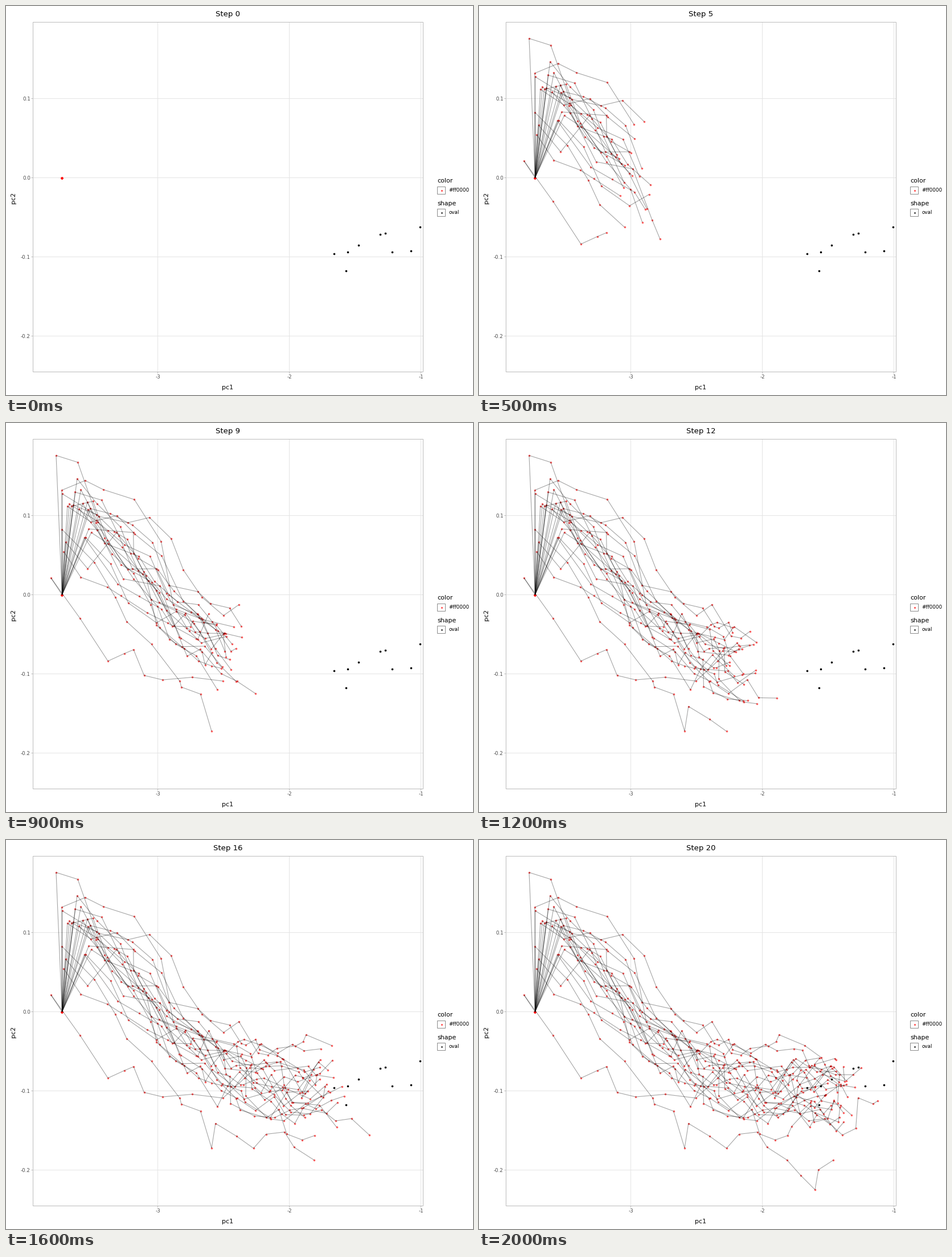
A matplotlib script for the animation above (2.1 s loop, 820 by 683 pixels).

```python
import numpy as np
import matplotlib.pyplot as plt
from matplotlib.animation import FuncAnimation
from matplotlib.collections import LineCollection
from matplotlib.patches import Rectangle

W, H, DPI = 820, 683, 64
PX = 72 / DPI  # points per pixel
STEPS, WALKERS = 20, 23
LEFT, TOP, RIGHT, BOTTOM = 47.5, 28.5, 732.5, 642.5
GRID, EDGE, TICK_TEXT = "#e4e4e4", "#bcbcbc", "#4d4d4d"

plt.rcParams["font.family"] = "DejaVu Sans"


def to_px(pc1, pc2):
    """Stage position of a data point."""
    return np.column_stack([959.3 + 230.8 * np.asarray(pc1, float),
                            301.5 - 1391 * np.asarray(pc2, float)])


START = to_px([-3.73], [0])[0]

# Key positions by step of the few walkers that shape the outline.
OUTLIERS = [
    {1: (88, 57), 2: (126, 69), 3: (173, 202)},
    {1: (98, 118), 2: (139, 101), 3: (171, 117)},
    {1: (79, 272), 2: (130, 343), 3: (179, 418), 5: (224, 398), 7: (275, 451)},
    {4: (252, 166), 5: (290, 203), 8: (382, 338), 15: (527, 342)},
    {3: (270, 286), 9: (438, 475), 12: (523, 483), 16: (638, 518), 20: (700, 458)},
    {9: (361, 541), 16: (541, 562), 18: (590, 614), 19: (596, 579)},
]


def bend(path, keys):
    """Pull a path through its key positions, fading out before and after."""
    steps = sorted(keys)
    gaps = [np.subtract(keys[s], path[s]) for s in steps]
    knots = [steps[0] - 4, *steps, steps[-1] + 5]
    gaps = np.array([(0, 0), *gaps, (0, 0)])
    t = np.arange(len(path))
    return path + np.column_stack([np.interp(t, knots, g) for g in gaps.T])


def make_paths(seed=7):
    rng = np.random.default_rng(seed)
    t = np.arange(STEPS + 1)
    centre = np.column_stack([
        np.interp(t, [1, 3, 5, 9, 16, 20], [118, 202, 268, 393, 566, 638]),
        np.interp(t, [1, 3, 5, 7, 9, 12, 20], [160, 225, 305, 368, 410, 443, 455])])
    noise = np.interp(t, [1, 5, 20], [40, 26, 24])
    reach = np.column_stack([np.full(STEPS + 1, 48.0),
                             np.interp(t, [1, 5, 12, 20], [150, 130, 105, 95])])

    paths = np.empty((WALKERS, STEPS + 1, 2))
    for i, path in enumerate(paths):
        drift = np.zeros_like(path)
        drift[1] = -38 + 76 * i / (WALKERS - 1), rng.normal(0, 35)
        for k in range(2, STEPS + 1):
            drift[k] = 0.78 * drift[k - 1] + rng.normal(0, (14, noise[k]))
        path[:] = centre + reach * np.tanh(drift / reach)
        if i < len(OUTLIERS):
            path[:] = bend(path, OUTLIERS[i])
        path[0] = START
    return paths


fig = plt.figure(figsize=(W / DPI, H / DPI), dpi=DPI, facecolor="white")
ax = fig.add_axes([0, 0, 1, 1])
ax.set(xlim=(0, W), ylim=(H, 0))
ax.axis("off")


def label(x, y, text, size, color="black", ha="left", va="baseline", **kw):
    return ax.text(x, y, text, fontsize=size * PX, color=color, ha=ha, va=va, **kw)


def line(xs, ys, color):
    ax.plot(xs, ys, color=color, lw=PX, zorder=1, solid_capstyle="butt", snap=False)


def box(x, y, w, h, color):
    ax.add_patch(Rectangle((x, y), w, h, fill=False, ec=color, lw=PX,
                           zorder=2, snap=False))


def dots(xy, color, size, alpha, zorder):
    x, y = np.transpose(xy)
    return ax.scatter(x, y, s=(size * PX) ** 2, color=color, alpha=alpha,
                      linewidths=0, zorder=zorder)


for value in (-3, -2, -1):
    x = np.floor(to_px(value, 0)[0, 0]) + 0.5
    line([x, x], [TOP, BOTTOM], GRID)
    line([x, x], [BOTTOM, BOTTOM + 3], EDGE)
    label(x, 654.5, str(value), 8.8, TICK_TEXT, "center")
for value in (0.1, 0.0, -0.1, -0.2):
    y = np.floor(to_px(0, value)[0, 1]) + 0.5
    line([LEFT, RIGHT], [y, y], GRID)
    line([LEFT - 3, LEFT], [y, y], EDGE)
    label(42.8, y + 3.2, f"{value:.1f}", 8.8, TICK_TEXT, "right")
box(LEFT, TOP, RIGHT - LEFT, BOTTOM - TOP, EDGE)

title = label(389.5, 18.3, "", 13.2, ha="center")
label(389.3, 673, "pc1", 11, ha="center")
label(13, 337, "pc2", 11, ha="center", va="center", rotation=90)

for y, head, name, color in ((310.5, "color", "#ff0000", "red"),
                             (349.5, "shape", "oval", "black")):
    label(757.4, y, head, 11)
    box(757.5, y + 7, 14, 13, "#8c8c8c")
    dots([(765, y + 13.6)], color, 3.2, 0.65, 3)
    label(777, y + 15.9, name, 8.8)

paths = make_paths()
visited = paths.swapaxes(0, 1).reshape(-1, 2)
segments = np.stack([paths[:, :-1], paths[:, 1:]], axis=2)
segments = segments.swapaxes(0, 1).reshape(-1, 2, 2)

red = dots([START], "red", 3.5, 0.62, 3)
trails = LineCollection([], colors=[(0, 0, 0, 0.36)], linewidths=1.1 * PX, zorder=4)
ax.add_collection(trails, autolim=False)
goals = to_px([-1.66, -1.57, -1.555, -1.476, -1.31, -1.27, -1.22, -1.075, -1.005],
              [-.096, -.1175, -.0935, -.0855, -.0718, -.07, -.0937, -.0927, -.0623])
dots(goals, "black", 3.6, 1, 5)


def draw(step):
    title.set_text(f"Step {step}")
    red.set_offsets(visited[:WALKERS * (step + 1)])
    trails.set_segments(segments[:WALKERS * step])
    return title, red, trails


anim = FuncAnimation(fig, draw, frames=STEPS + 1, interval=100, repeat=True,
                     repeat_delay=0, blit=False)
plt.show()
```
